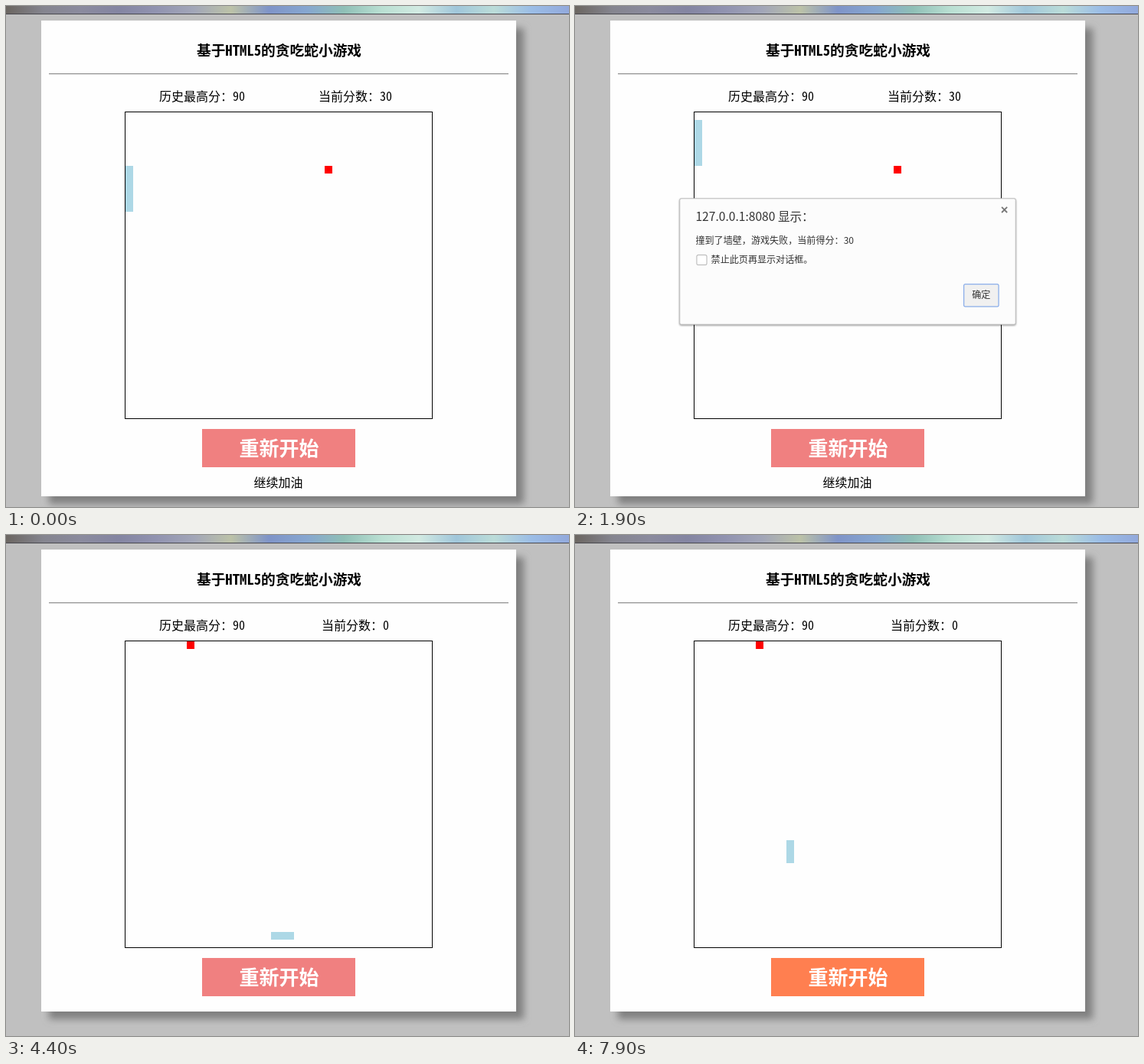
Write an HTML page that moves like this. It is 735x655 px and loops after 8 s.

```html
<!DOCTYPE html>
<html lang="zh-CN">
<head>
<meta charset="utf-8">
<title>贪吃蛇</title>
<style>
  html, body { margin: 0; width: 100%; height: 100%; overflow: hidden; background: #c0c0c0; }
  svg { display: block; }
  text { font-family: "Noto Sans Mono CJK SC", "Noto Sans CJK SC", "Noto Sans CJK", monospace; font-size: 16px; }
  .mid { text-anchor: middle; }
  .thin { font-weight: 300; }
  #dialog text { font-family: "Noto Sans CJK SC", "Noto Sans CJK", sans-serif; font-size: 12px; fill: #333; }
  #dialog .host { font-size: 15.5px; }
  #dialog { transform-origin: 356px 334px; }
  #frame { filter: drop-shadow(0 1px 1.2px rgba(0, 0, 0, .4)); }
</style>
</head>
<body>
<svg width="735" height="655" viewBox="0 0 735 655">
  <defs>
    <linearGradient id="sky"></linearGradient>
    <filter id="blur" x="-10%" y="-10%" width="120%" height="120%"><feGaussianBlur stdDeviation="5"/></filter>
  </defs>

  <rect width="735" height="655" fill="#c0c0c0"/>
  <rect width="735" height="10" fill="url(#sky)"/>
  <rect y="10" width="735" height="1" fill="#4a4a50"/>

  <rect class="card" x="56" y="29" width="620" height="622" fill="#808080" filter="url(#blur)"/>
  <rect class="card" x="46" y="19" width="620" height="622" fill="#fefefe"/>

  <text class="mid" x="356.5" y="65.3" style="font-size:18.72px;font-weight:700">基于HTML5的贪吃蛇小游戏</text>
  <rect x="56" y="88" width="600" height="1" fill="#909090"/>
  <rect x="56" y="89" width="600" height="1" fill="#e4e4e4"/>
  <text class="mid thin" x="256" y="123.5">历史最高分：90</text>
  <text class="mid thin" x="456" y="123.5" id="score"></text>

  <rect x="155.5" y="138.5" width="401" height="401" fill="none" stroke="#000"/>
  <path id="snake" fill="#add8e6"/>
  <rect id="food" width="10" height="10" fill="#f00"/>

  <rect id="restart" x="256" y="553" width="200" height="50"/>
  <text class="mid" x="356.5" y="587.7" fill="#fff" style="font-size:26px;font-weight:700">重新开始</text>
  <text class="mid thin" x="355.5" y="628.5" id="tip">继续加油</text>

  <g id="dialog">
    <rect id="frame" x="138.5" y="252.5" width="435" height="163" rx="2" fill="#fcfcfc" stroke="#bdbdbd"/>
    <path d="M555.5 263.5l7 7m0-7l-7 7" stroke="#777" stroke-width="1.8"/>
    <text class="host" x="159" y="281.8">127.0.0.1:8080 显示：</text>
    <text x="159" y="311.4">撞到了墙壁，游戏失败，当前得分：30</text>
    <rect x="160.5" y="325.5" width="13" height="13" rx="2" fill="#fff" stroke="#b4b4b4"/>
    <text x="179" y="336.4">禁止此页再显示对话框。</text>
    <rect id="ok" x="506.5" y="363.5" width="45" height="29" rx="1.5" stroke="#6f9be6"/>
    <text class="mid" x="529" y="382">确定</text>
  </g>
</svg>
<script>
const LOOP = 8000, RESTART = 2800;
const $ = id => document.getElementById(id);

const tones = ['#6b6661', '#85858f', '#8b8b9e', '#8485a2', '#9193b0', '#a2a6b8', '#bcc2a8', '#7f94c8',
  '#86a6d0', '#8fbfb6', '#b9dfd2', '#d2eae2', '#a0c6da', '#bbdcd8', '#9bbde6', '#92a9dc'];
$('sky').innerHTML = tones.map((c, i) =>
  `<stop offset="${i / (tones.length - 1)}" stop-color="${c}"/>`).join('');

// Game clock: six moves every 1100 ms, seen on a 100 ms grid
const beats = [0, 200, 400, 600, 700, 900];
const ticks = t => t < 0 ? 0 :
  6 * Math.floor(t / 1100) + beats.filter(b => b <= t % 1100).length;

const firstRun = k => [156, 209 - 10 * k];
const secondRun = k => k <= 16 ? [436 - 10 * k, 519] : [276, 519 - 10 * (k - 16)];

function snakePath(route, head, length) {
  let d = '';
  for (let i = 0; i < length; i++) d += `M${route(head - i)}h10v10h-10z`;
  return d;
}

// [start, opacity, scale]
const dialogSteps = [[0, 0, 1], [1200, .35, .99], [1300, .78, 1], [1400, 1, 1.008], [2600, .35, 1], [2700, 0, 1]];

function draw(t) {
  const again = t >= RESTART;
  $('snake').setAttribute('d', again
    ? snakePath(secondRun, ticks(t - 2600) - 2, 3)
    : snakePath(firstRun, Math.min(6, ticks(t - 100)), 6));
  $('food').setAttribute('x', again ? 236 : 416);
  $('food').setAttribute('y', again ? 139 : 209);
  $('score').textContent = '当前分数：' + (again ? 0 : 30);
  $('tip').style.visibility = again ? 'hidden' : 'visible';
  for (const card of document.querySelectorAll('.card')) card.setAttribute('height', again ? 604 : 622);
  $('restart').setAttribute('fill', t >= 7700 ? '#ff7f50' : '#f08080');

  const [, opacity, scale] = dialogSteps.filter(s => s[0] <= t).pop();
  $('dialog').style.opacity = opacity;
  $('dialog').style.transform = `scale(${scale})`;
  $('ok').setAttribute('fill', t >= 1900 ? '#f0f0f0' : '#fefefe');
}

const start = performance.now();
function tick() {
  draw((performance.now() - start) % LOOP);
  requestAnimationFrame(tick);
}
tick();
</script>
</body>
</html>
```
